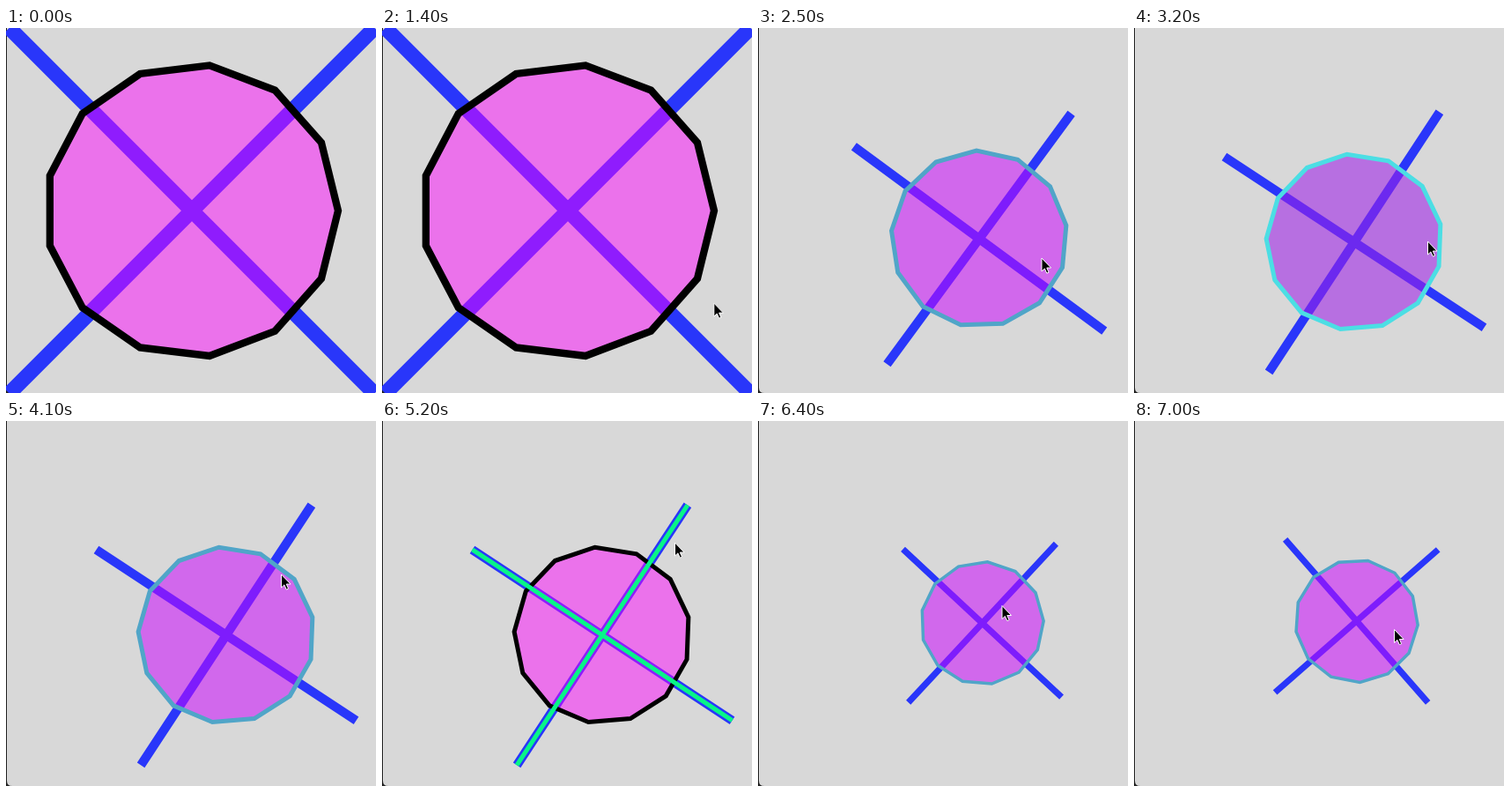
Recreate the animation shown at these times as an HTML page. Size 420 by 414 pixels, loop 7.2 s.

```html
<!DOCTYPE html>
<html lang="en">
<head>
<meta charset="utf-8">
<title>Zoom, rotate and hover</title>
<style>
html, body { margin: 0; width: 100%; height: 100%; overflow: hidden; background: #d8d8d8; }
svg { display: block; width: 100vw; height: 100vh; }
</style>
</head>
<body>
<svg viewBox="0 0 420 414" preserveAspectRatio="none">
  <rect width="420" height="414" fill="#222"/>
  <path d="M1 0H420V414H7Q1 414 1 408Z" fill="#d8d8d8"/>
  <g id="shape">
    <path class="cross" fill="none" stroke="#2936fa" stroke-width="17"/>
    <polygon id="disc" stroke-width="8.3"/>
    <path id="core" class="cross" fill="none" stroke="#08f587" stroke-width="8.5"/>
  </g>
  <path id="cursor" d="M0 0V15L3.4 11.9L5.8 17.2L8.1 16.2L5.8 11H10.6Z" fill="#000" stroke="#fff"/>
</svg>
<script>
const LOOP = 7200, STEP = 100, ENTER = 1300;
const CX = 211, CY = 207.2, RADIUS = 166, ARM = 207.3, SIDES = 13;
const REACH = 14; // how close to the cross counts as touching it
const $ = id => document.getElementById(id);

const looks = {
  normal: { fill: 'rgba(255,0,255,.475)', stroke: '#000' },
  hover: { fill: 'rgba(203,5,255,.525)', stroke: '#50a5c8' },
  press: { fill: 'rgba(158,33,233,.57)', stroke: '#4bdee4' }
};

const press = { from: 3000, to: 3500 };

// Pointer moves: eased from the last resting point to x, y.
const entry = { x: 396, y: 330 };
const moves = [
  { from: ENTER, to: 1600, x: 322, y: 261 },
  { from: 2800, to: 3200, x: 333.5, y: 242 },
  { from: 3600, to: 4100, x: 312.5, y: 174 },
  { from: 4200, to: 5200, x: 332.5, y: 138 },
  { from: 5300, to: 5700, x: 277, y: 209.5 },
  { from: 6700, to: 7000, x: 295.5, y: 236.5 }
];

// Each gesture zooms, then turns, about the resting pointer.
const gestures = [
  { x: 322, y: 261, scale: .602, zoom: 1715, angle: -11.7, turn: 2100 },
  { x: 277, y: 209.5, scale: .697, zoom: 5900, angle: 15.5, turn: 6050 }
];
const ZOOM_MS = 400, TURN_MS = 600;

function ease(t, from, to) {
  const u = Math.min(1, Math.max(0, (t - from) / (to - from)));
  return u * u * (3 - 2 * u);
}

function rotate(x, y, deg) {
  const a = deg * Math.PI / 180, c = Math.cos(a), s = Math.sin(a);
  return { x: x * c - y * s, y: x * s + y * c };
}

function poseAt(t) {
  const pose = { x: CX, y: CY, scale: 1, angle: 0 };
  for (const g of gestures) {
    const k = 1 + (g.scale - 1) * ease(t, g.zoom, g.zoom + ZOOM_MS);
    const a = g.angle * ease(t, g.turn, g.turn + TURN_MS);
    const d = rotate(pose.x - g.x, pose.y - g.y, a);
    pose.x = g.x + k * d.x;
    pose.y = g.y + k * d.y;
    pose.scale *= k;
    pose.angle += a;
  }
  return pose;
}

function pointerAt(t) {
  let { x, y } = entry;
  for (const m of moves) {
    const u = ease(t, m.from, m.to);
    x += (m.x - x) * u;
    y += (m.y - y) * u;
  }
  return { x, y };
}

function stateAt(t, pose, p) {
  if (t < ENTER) return 'normal';
  if (t >= press.from && t < press.to) return 'press';
  const d = rotate(p.x - pose.x, p.y - pose.y, -pose.angle);
  if (Math.hypot(d.x, d.y) < RADIUS * pose.scale) return 'hover';
  const gap = Math.abs(Math.abs(d.x) - Math.abs(d.y)) * Math.SQRT1_2;
  return gap < REACH ? 'cross' : 'normal';
}

function build() {
  const corners = Array.from({ length: SIDES }, (_, i) => {
    const p = rotate(RADIUS, 0, i * 360 / SIDES);
    return p.x + ',' + p.y;
  });
  $('disc').setAttribute('points', corners.join(' '));
  const d = `M${-ARM} ${-ARM}L${ARM} ${ARM}M${ARM} ${-ARM}L${-ARM} ${ARM}`;
  document.querySelectorAll('.cross').forEach(el => el.setAttribute('d', d));
}

function show(id, on) {
  $(id).setAttribute('visibility', on ? 'visible' : 'hidden');
}

function draw(time) {
  const t = Math.floor(time % LOOP / STEP) * STEP;
  const pose = poseAt(t), p = pointerAt(t), state = stateAt(t, pose, p);
  const look = looks[state] || looks.normal;
  $('shape').setAttribute('transform',
    `translate(${pose.x} ${pose.y}) rotate(${pose.angle}) scale(${pose.scale})`);
  $('disc').setAttribute('fill', look.fill);
  $('disc').setAttribute('stroke', look.stroke);
  $('cursor').setAttribute('transform', `translate(${p.x} ${p.y})`);
  show('core', state === 'cross');
  show('cursor', t >= ENTER);
}

build();
const start = performance.now();
function tick() {
  draw(performance.now() - start);
  requestAnimationFrame(tick);
}
tick();
</script>
</body>
</html>
```
